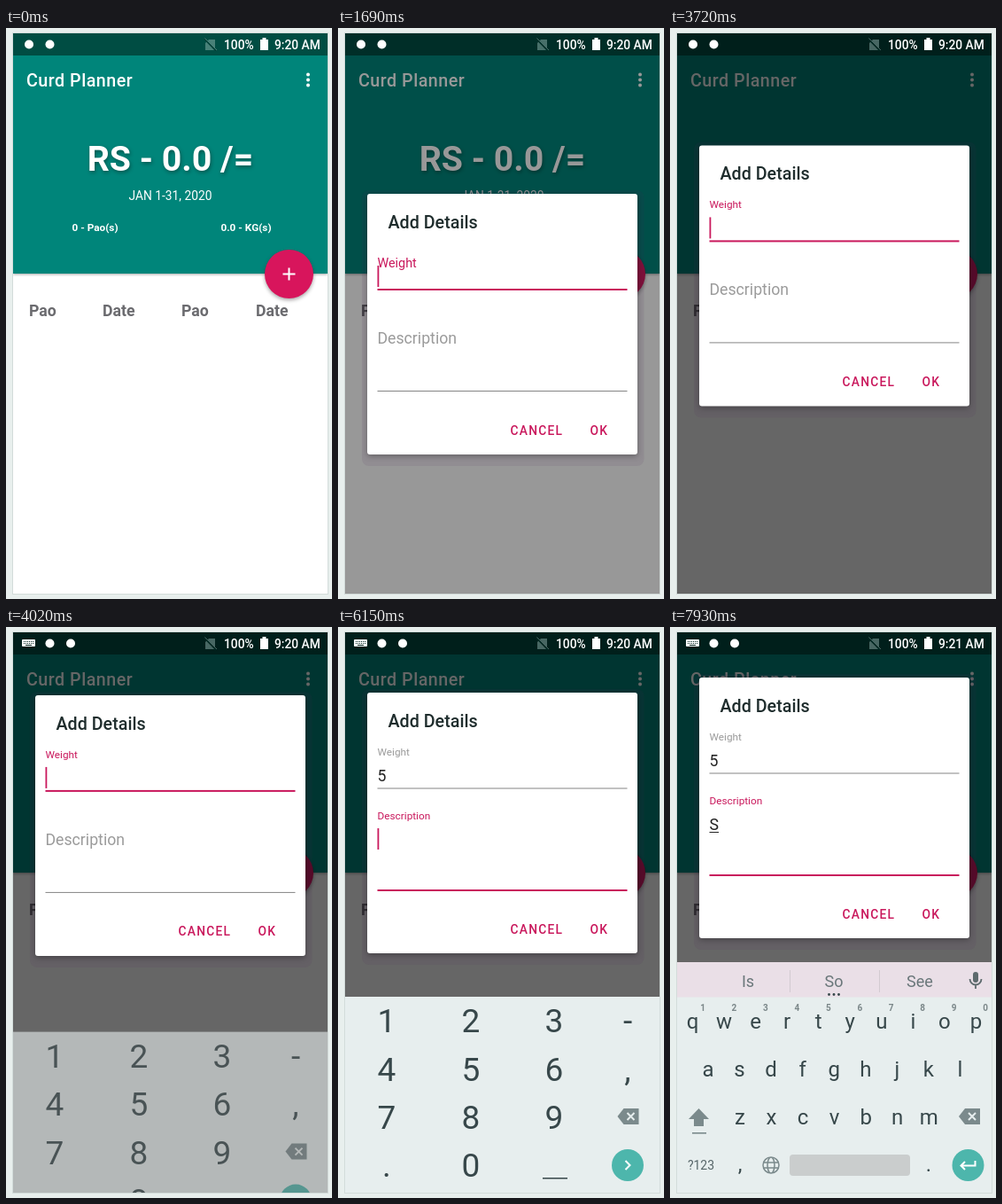
These frames come from a looping animation (368 px wide and 644 px high, 8000 ms). An HTML page:

```html
<!DOCTYPE html>
<html lang="en">
<head>
<meta charset="utf-8">
<title>Add details</title>
<style>
  html, body { margin: 0; width: 100%; height: 100%; overflow: hidden; background: #e8efed; }
  svg { display: block; width: 368px; height: 644px; font-family: Roboto, sans-serif; }
  .header { filter: drop-shadow(0 1.5px 1.5px rgba(0, 0, 0, .35)); }
  .fab { filter: drop-shadow(0 2.5px 2px rgba(0, 0, 0, .35)); }
  .card { filter: drop-shadow(0 2px 3px rgba(0, 0, 0, .3)); }
  .big { filter: drop-shadow(1px 2px 2px rgba(0, 0, 0, .35)); }
</style>
</head>
<body>
<svg id="stage" viewBox="0 0 368 644"></svg>
<script>
const LOOP = 8000, PINK = '#c9185c', INK = '#37474a', GREY = '#9b9b9b';
const OPEN = 1505, FLOAT = 1600, KEYS = 3720, FIVE = 4640, NEXT = 5150, LETTERS = 6210, TYPE_S = 7150, SUGGEST = 7740;

const text = (x, y, str, size, fill, attrs = '') =>
  `<text x="${x}" y="${y}" font-size="${size}" fill="${fill}" ${attrs}>${str}</text>`;
const rect = (x, y, w, h, fill, attrs = '') =>
  `<rect x="${x}" y="${y}" width="${w}" height="${h}" fill="${fill}" ${attrs}/>`;
const circle = (x, y, r, fill, attrs = '') =>
  `<circle cx="${x}" cy="${y}" r="${r}" fill="${fill}" ${attrs}/>`;
const path = (d, stroke, width, attrs = '') =>
  `<path d="${d}" fill="none" stroke="${stroke}" stroke-width="${width}" ${attrs}/>`;
const MID = 'text-anchor="middle"', BOLD = 'font-weight="700"', MEDIUM = 'font-weight="500"';

const statusBar = `
  ${rect(8, 6, 355, 25, 'none')}
  <g id="imeIcon">
    ${rect(18, 14, 15, 8, '#fff', 'rx="1"')}
    ${path('M20 16.5H31M20 18.5H31', '#00251f', 1, 'stroke-dasharray="1 1"')}
    ${path('M22 20.5H29', '#00251f', 1)}
  </g>
  <g id="icons">${circle(26, 18.5, 5, '#fff')}${circle(49.5, 18.5, 5, '#fff')}</g>
  <g opacity=".45">
    <path d="M229 13H236V25H225V17Z" fill="#9fc0ba"/>
    ${path('M224 12L237 25.5', '#00332c', 2)}${path('M224.5 11.5L238 25', '#9fc0ba', 1)}
  </g>
  ${text(246, 24, '100%', 13.8, '#fff', MEDIUM)}
  <path d="M287 13H289.5V11H293.5V13H296V25H287Z" fill="#fff"/>
  <text id="clock" x="303" y="24" font-size="13.8" fill="#fff" font-weight="500"></text>`;

const home = `
  ${rect(8, 31, 355, 607, '#fff')}
  <g class="header">${rect(8, 31, 355, 246, '#00857a')}</g>
  ${rect(8, 6, 355, 25, '#004d43')}
  ${text(23, 66, 'Curd Planner', 19.7, '#fff', MEDIUM + ' letter-spacing=".5"')}
  ${[52.5, 58.5, 64.5].map(y => circle(341, y, 2, '#fff')).join('')}
  <g class="big">${text(185.5, 161, 'RS - 0.0 /=', 39.3, '#fff', MID + BOLD)}</g>
  ${text(185.5, 193.5, 'JAN 1-31, 2020', 13.8, '#fff', MID)}
  ${text(100.5, 229, '0 - Pao(s)', 11.8, '#fff', MID + ' ' + BOLD)}
  ${text(271, 229, '0.0 - KG(s)', 11.8, '#fff', MID + ' ' + BOLD)}
  ${[['Pao', 26], ['Date', 109], ['Pao', 198], ['Date', 282]]
    .map(([s, x]) => text(x, 325, s, 17.7, '#6b6b6f', BOLD)).join('')}
  <g class="fab">${circle(319.5, 277.5, 27.5, '#d8155c')}</g>
  <circle id="ripple" cx="319.5" cy="277.5" fill="#fff"/>
  ${path('M312.5 277.5H326.5M319.5 270.5V284.5', '#fff', 2)}`;

const dialog = `
  <g id="dialog">
    ${rect(27, -4, 318.5, 311, '#4c2c5c', 'rx="8" opacity=".1"')}
    <g class="card">${rect(33, 0, 305, 294, '#fff', 'rx="3"')}</g>
    ${text(56.5, 39, 'Add Details', 19.7, '#1f2d2d', MEDIUM)}
    ${text(44.5, 0, 'Weight', 12, PINK, 'id="weightLabel"')}
    ${text(44.5, 100, '5', 17.7, '#222', 'id="five"')}
    <rect id="weightLine" x="44.5" width="282"/>
    ${text(44.5, 0, 'Description', 12, GREY, 'id="noteLabel"')}
    <g id="letterS">${text(44.5, 172, 'S', 17.7, '#222')}${rect(44.5, 174, 10.5, 1, '#222')}</g>
    <rect id="noteLine" x="44.5" width="282"/>
    ${rect(44.5, 0, 1.8, 24, PINK, 'id="cursor"')}
    ${text(194.5, 271.5, 'CANCEL', 13.8, PINK, MEDIUM + ' letter-spacing="1.23"')}
    ${text(284.5, 271.5, 'OK', 13.8, PINK, MEDIUM + ' letter-spacing="1.23"')}
  </g>`;

const backspace = x => `<g transform="translate(${x} 552)">
  <path d="M-12 0L-5 -9H12V9H-5Z" fill="#7b8a8c"/>
  ${path('M-1 -4L7 4M7 -4L-1 4', '#e7eeee', 2)}</g>`;
const rows = [444, 498.5, 553, 607];

const numberPad = `<g id="numberPad">
  ${['123-', '456,', '789', '.0'].map((row, r) => [...row].map((key, c) =>
    text([55, 150, 244, 327][c], rows[r] + 13, key, 37, INK, MID)).join('')).join('')}
  ${rect(231, 621, 28, 1.5, INK)}${backspace(327.5)}
  ${circle(327, 607, 18, '#4db6ac', 'id="next"')}
  ${path('M324.5 602L329.5 607L324.5 612', '#fff', 2)}</g>`;

const letterRow = (keys, x, y) => [...keys].map((key, i) =>
  text(x + 35.55 * i, y, key, 24, INK, MID + ' class="key"')).join('');

const letterPad = `<g id="letterPad">
  ${rect(8, 378, 355, 39.5, '#eadfe7')}
  ${rect(135, 387, 1, 25, '#d2cbd0')}${rect(236, 387, 1, 25, '#d2cbd0')}
  <g id="words">
    ${['Is', 'So', 'See'].map((s, i) => text(88 + 97 * i, 406, s, 18, '#6a777a', MID)).join('')}
    ${[179.5, 185, 190.5].map(x => circle(x, 414.5, 1.4, INK)).join('')}
  </g>
  ${rect(342, 389, 6, 12, '#5d6a6d', 'rx="3"')}
  ${path('M338.5 397A6.5 6.5 0 0 0 351.5 397M345 403.5V408', '#5d6a6d', 1.8)}
  ${letterRow('qwertyuiop', 25.5, 453)}
  ${[...'1234567890'].map((n, i) => text(37 + 35.45 * i, 433, n, 10, '#7b8789', MID + ' ' + BOLD)).join('')}
  ${letterRow('asdfghjkl', 43, 507)}${letterRow('zxcvbnm', 79, 561)}
  <path d="M32.5 543L44 555H38V563H27V555H21Z" fill="#7b8a8c"/>${rect(25, 570, 16, 1.6, '#7b8a8c')}
  ${backspace(338)}
  ${text(35, 612, '?123', 14, '#566568', MID)}${text(79, 614, ',', 24, INK, MID)}
  ${path('M105 607a9 9 0 1 0 18 0a9 9 0 1 0 -18 0M110 607a4 9 0 1 0 8 0a4 9 0 1 0 -8 0M106 604H122M106 610H122', '#7b8a8c', 1.5)}
  ${rect(135, 595, 136, 24, '#cacdcd', 'rx="4"')}${text(292, 614, '.', 24, INK, MID)}
  ${circle(336.5, 607, 18, '#4db6ac')}
  ${path('M344.5 602V607.5H329M333 603L328.5 607.5L333 612', '#fff', 2)}</g>`;

const stage = document.getElementById('stage');
stage.innerHTML = `
  <clipPath id="screen">${rect(8, 6, 355, 632, '#000')}</clipPath>
  ${rect(7.5, 5.5, 356, 633, 'none', 'stroke="#d3dcda"')}
  <g clip-path="url(#screen)">
    ${home}
    ${rect(8, 6, 355, 632, '#000', 'id="scrim"')}
    ${statusBar}
    ${dialog}
    <g id="keyboard">${rect(8, 417, 355, 222, '#e7eeee')}${numberPad}${letterPad}</g>
  </g>`;

const el = {};
stage.querySelectorAll('[id]').forEach(node => el[node.id] = node);
const keyLabels = [...stage.querySelectorAll('.key')];

const progress = (t, start, length) => Math.min(1, Math.max(0, (t - start) / length));
const smooth = p => p * p * (3 - 2 * p);
const set = (node, attrs) => { for (const k in attrs) node.setAttribute(k, attrs[k]); };
const show = (node, on) => node.setAttribute('visibility', on ? 'inherit' : 'hidden');
const settle = (t, start, from, to) => to + (from - to) * Math.exp((start - t) / 100);

function floatLabel(node, p, low, high, focused) {
  set(node, {
    y: low + (high - low) * p,
    'font-size': 17.7 - 5.9 * p,
    fill: focused && p > 0 ? PINK : GREY
  });
}

function underline(node, y, focused) {
  set(node, focused ? { y: y - 1, height: 2, fill: PINK } : { y: y - .5, height: 1, fill: '#858585' });
}

function dialogTop(t) {
  if (t < KEYS) return 187;
  return t < LETTERS ? settle(t, KEYS, 133, 74) : settle(t, LETTERS, 74, 57);
}

function render(t) {
  const onNote = t >= NEXT, typedS = t >= TYPE_S, letters = t >= LETTERS;

  set(el.ripple, {
    r: 27.5 * smooth(progress(t, 1000, 250)),
    opacity: .25 * (1 - progress(t, 1250, 250))
  });
  set(el.scrim, { opacity: .6 * progress(t, 1570, 180) });

  const imeOpen = t >= KEYS + 60;
  show(el.imeIcon, imeOpen);
  set(el.icons, { transform: `translate(${imeOpen ? 23.5 : 0} 0)` });
  el.clock.textContent = t < SUGGEST ? '9:20 AM' : '9:21 AM';

  set(el.dialog, { opacity: progress(t, OPEN, 140), transform: `translate(0 ${dialogTop(t)})` });
  floatLabel(el.weightLabel, smooth(progress(t, FLOAT, 167)), 99, 71, !onNote);
  floatLabel(el.noteLabel, smooth(progress(t, NEXT, 167)), 169, 143, onNote);
  underline(el.weightLine, 108, !onNote);
  underline(el.noteLine, onNote ? 223 : 222.5, onNote);
  show(el.five, t >= FIVE);
  show(el.letterS, typedS);

  // The blink restarts with every edit or change of focus.
  const blinkStart = [TYPE_S, NEXT, FIVE, FLOAT, 1500].find(s => t >= s) ?? 0;
  show(el.cursor, (t - blinkStart) % 1000 < 500);
  set(el.cursor, {
    x: typedS || (t >= FIVE && !onNote) ? 55.5 : 44.5,
    y: onNote ? 153 : 81
  });

  const slide = progress(t, 3870, 250);
  set(el.keyboard, { opacity: slide, transform: `translate(0 ${100 * (1 - slide)})` });
  show(el.numberPad, !letters);
  show(el.letterPad, letters);
  show(el.words, t >= SUGGEST);
  set(el.next, { fill: t >= NEXT - 70 && t < NEXT + 70 ? '#3d9a92' : '#4db6ac' });
  keyLabels.forEach(node => {
    node.textContent = typedS ? node.textContent.toLowerCase() : node.textContent.toUpperCase();
  });
}

const start = performance.now();
(function tick() {
  render((performance.now() - start) % LOOP);
  requestAnimationFrame(tick);
})();
</script>
</body>
</html>
```
